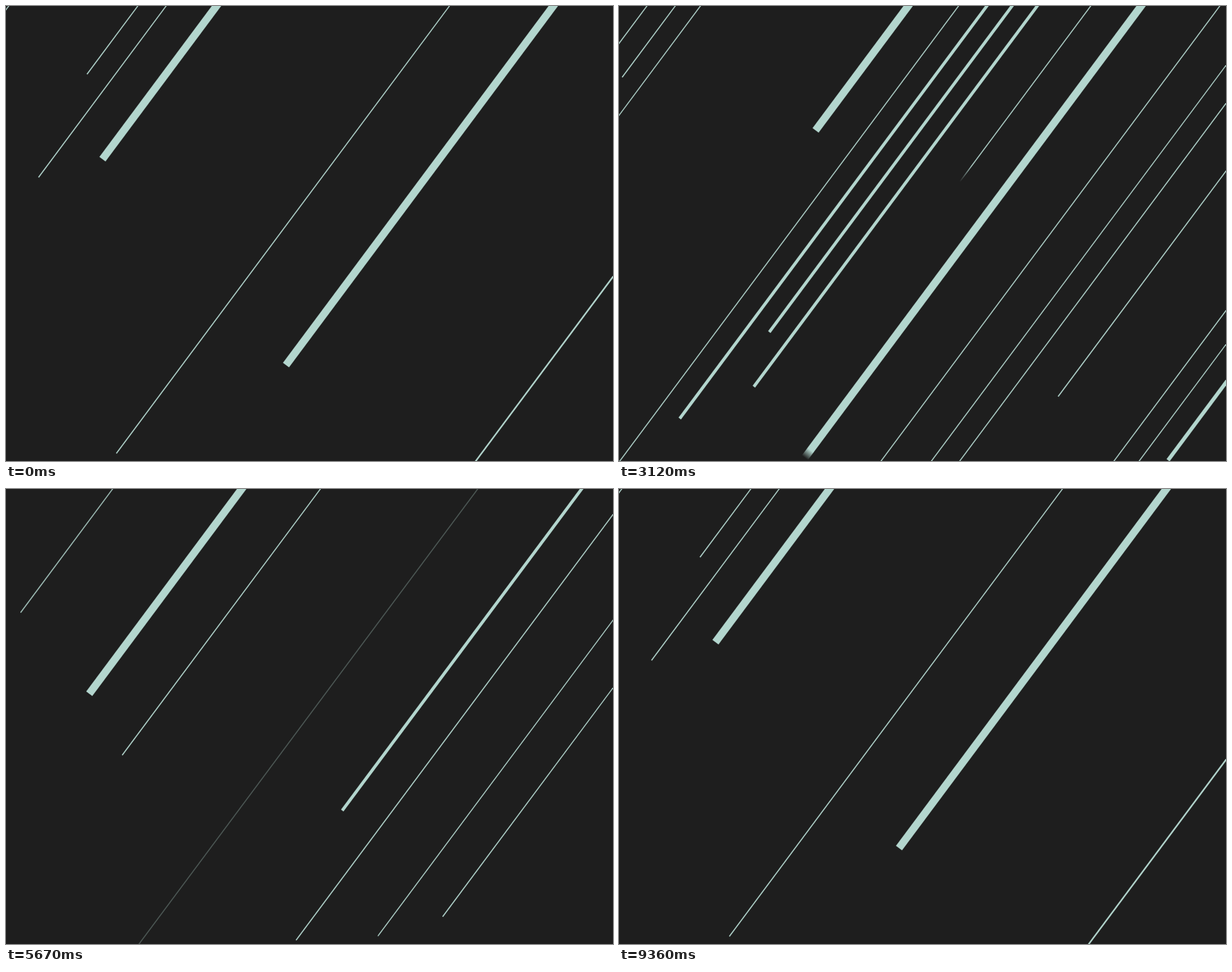
Recreate the animation shown at these times as an HTML page with a canvas. Size 800x600 px, loop 9570 ms.

```html
<!DOCTYPE html>
<html lang="en">
<head>
<meta charset="utf-8">
<title>Falling lines</title>
<style>
html, body { margin: 0; width: 100%; height: 100%; overflow: hidden; background: #1e1e1e; }
canvas { display: block; }
</style>
</head>
<body>
<canvas width="800" height="600"></canvas>
<script>
const ctx = document.querySelector('canvas').getContext('2d');
const LOOP = 9570, GROW = 600, FADE = 270, SLOPE = 0.744;
const OFF = 680, THIN = 1.3, COLOR = '#b3d6ce';
const lines = [];

// Columns stand in blocks of four; returns x at the top edge.
const columnX = c => -62.8 + 136.9 * (c >> 2) + 33.2 * (c & 3);

// Lines of a wave start to grow, and later to fade, at even intervals.
function wave(grow, fade, ...members) {
  const spread = ([from, to], i) => from + (to - from) * i / Math.max(1, members.length - 1);
  members.forEach(([column, tip = OFF, width = THIN], i) => lines.push({
    x: columnX(column), tip, width, start: spread(grow, i), end: spread(fade, i)
  }));
}

wave([345, 545], [2760, 3560], [32, 578], [30, 515], [36, 599, 5]);
wave([400, 640], [3700, 4300], [35], [16, 544, 4], [17, 430, 4], [18, 502, 4]);
wave([1238, 1628], [3150, 3330], [25], [3], [5], [28]);
wave([1500, 1780], [5000, 5300], [4, 94], [15], [13, 164, 10]);
wave([1800, 1900], [4650, 4695], [34], [27]);
wave([2763, 3034], [5250, 5490], [22, 546, 10], [20]);
wave([3720, 3990], [5640, 7260], [6, 163], [14, 351], [24, 424, 4], [31, 564]);
wave([4804, 5098], [7260, 7740], [11, 270, 10], [26, 595], [29, 587]);
wave([6180, 6390], [8050, 8900], [9, 289, 10], [21], [12, 450.5, 10]);
wave([7180, 7230], [8800, 8850], [37, OFF, 4], [38, OFF, 4]);
wave([7130, 7130], [LOOP + 345, LOOP + 345], [33, OFF, 2]);
wave([7900, 8760], [LOOP + 1230, LOOP + 2505],
  [8, 226], [2], [7, 90], [19, 590], [10, 202, 10], [23, 473.5, 10]);

function overshoot(t) {
  const u = t ** 1.3 - 1;
  return 1 + 2.70158 * u ** 3 + 1.70158 * u ** 2;
}

function drawLine({ x, tip, width, start, end }, time) {
  const age = (time - start + LOOP) % LOOP;
  const fade = (age - (end - start)) / FADE;
  if (fade >= 1) return;
  const grown = Math.min(1, age / GROW);
  const y = tip * overshoot(grown);
  const at = v => [x - v * SLOPE, v];
  ctx.globalAlpha = 1 - Math.max(0, fade);
  ctx.lineWidth = width;
  ctx.strokeStyle = COLOR;
  if (grown < 1) {
    // The moving tip is soft and sharpens as it settles.
    const soft = 25 * (1 - grown) + 0.01;
    const blur = ctx.createLinearGradient(...at(y - soft), ...at(y));
    blur.addColorStop(0, COLOR);
    blur.addColorStop(1, COLOR + '00');
    ctx.strokeStyle = blur;
  }
  ctx.beginPath();
  ctx.moveTo(...at(-30));
  ctx.lineTo(...at(y));
  ctx.stroke();
}

function draw() {
  const time = performance.now() % LOOP;
  ctx.globalAlpha = 1;
  ctx.fillStyle = '#1e1e1e';
  ctx.fillRect(0, 0, 800, 600);
  for (const line of lines) drawLine(line, time);
  requestAnimationFrame(draw);
}
draw();
</script>
</body>
</html>
```
